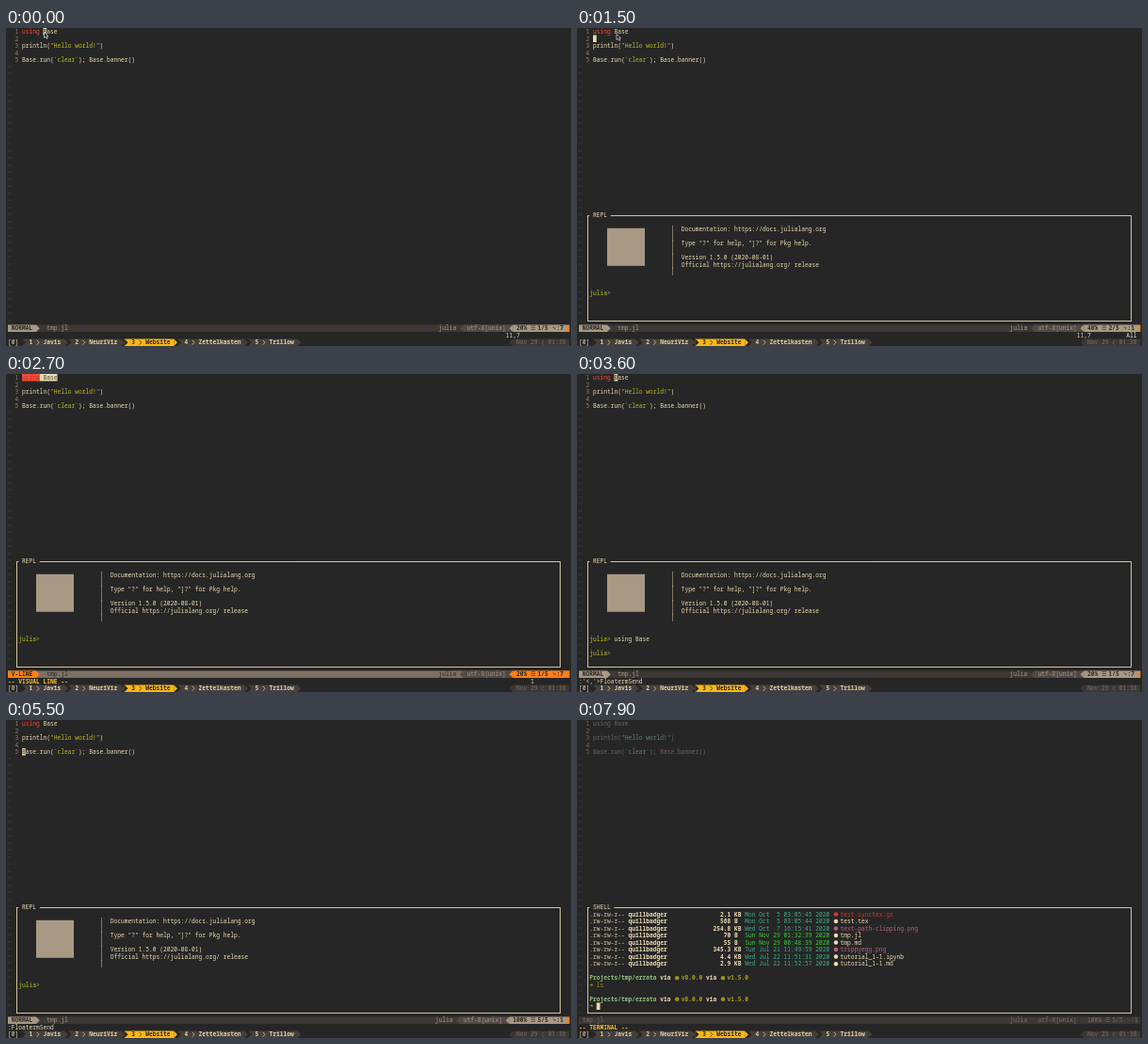
Animation, 600 px wide and 338 px high, one loop 8000 ms. Source, as an HTML page with a canvas:

```html
<!DOCTYPE html>
<html lang="en">
<head>
<meta charset="utf-8">
<title>Editor with a floating REPL</title>
<style>
  html, body { margin: 0; width: 100%; height: 100%; overflow: hidden; background: #262626; }
  canvas { display: block; width: 600px; height: 338px; }
</style>
</head>
<body>
<canvas id="screen"></canvas>
<script>
const LOOP = 8000;
const BG = '#262626', FG = '#ebdbb2', RED = '#fb4934', GREEN = '#b8bb26', ORANGE = '#fe8019',
      SAND = '#a89984', GREY = '#7c6f64', DARK = '#3c3836', MID = '#504945', AQUA = '#8ec07c';

// Drawing units are quarter pixels; the terminal is a grid of 159 x 45 cells.
const CELL_W = 15, CELL_H = 1352 / 45, LEFT = 8;
const FLOAT = { left: 2, right: 156, top: 26, bottom: 41 };

const canvas = document.getElementById('screen');
const ctx = canvas.getContext('2d');
const dpr = window.devicePixelRatio || 1;
canvas.width = 600 * dpr;
canvas.height = 338 * dpr;
ctx.setTransform(dpr / 4, 0, 0, dpr / 4, 0, 0);

const x = col => LEFT + col * CELL_W;
const y = row => row * CELL_H;
const pixelCentre = units => Math.floor(units / 4) * 4 + 2;

function text(col, row, string, color = FG, bold = false) {
  ctx.font = `${bold ? 'bold ' : ''}25px "Noto Sans Mono", "DejaVu Sans Mono", monospace`;
  ctx.fillStyle = color;
  ctx.fillText(string, x(col), y(row) + 24);
}

// Draws [string, color, bold] parts one after another.
function line(col, row, parts) {
  for (const [string, color, bold] of parts) {
    text(col, row, string, color, bold);
    col += string.length;
  }
}

function fill(col, row, cols, color, rows = 1) {
  ctx.fillStyle = color;
  ctx.fillRect(x(col), y(row), cols * CELL_W, rows * CELL_H);
}

function polygon(points, color) {
  ctx.beginPath();
  points.forEach(([px, py]) => ctx.lineTo(px, py));
  ctx.closePath();
  ctx.fillStyle = color;
  ctx.fill();
}

// A triangle filling one cell, pointing right or left.
function arrow(col, row, color, pointsLeft = false) {
  const base = x(pointsLeft ? col + 1 : col), tip = x(pointsLeft ? col : col + 1);
  polygon([[base, y(row)], [tip, y(row + .5)], [base, y(row + 1)]], color);
}

function chevron(col, row, color, pointsLeft = false) {
  const a = x(col) + (pointsLeft ? 12 : 3), b = x(col) + (pointsLeft ? 3 : 12);
  ctx.beginPath();
  ctx.moveTo(a, y(row) + 5);
  ctx.lineTo(b, y(row + .5));
  ctx.lineTo(a, y(row + 1) - 5);
  ctx.strokeStyle = color;
  ctx.lineWidth = 3;
  ctx.stroke();
}

function dot(col, row, color) {
  ctx.beginPath();
  ctx.arc(x(col) + 12, y(row + .5), 9, 0, 7);
  ctx.fillStyle = color;
  ctx.fill();
}

function block(col, row, letter = '') {
  fill(col, row, 1, FG);
  text(col, row, letter, BG);
}

const code = (keyword, plain, string) => [
  [['using', keyword], [' Base', plain]],
  [],
  [['println(', plain], ['"Hello world!"', string], [')', plain]],
  [],
  [['Base.run(', plain], ['`clear`', string], ['); Base.banner()', plain]]
];
const activeCode = code(RED, FG, GREEN);
const dimCode = code('#6b665f', '#6b665f', '#64806c');

function editor(s) {
  (s.focused ? activeCode : dimCode).forEach((parts, row) => {
    text(2, row, String(row + 1), s.focused ? '#928374' : GREY);
    line(4, row, parts);
  });
  for (let row = 5; row < 42; row++) text(0, row, '~', MID);
  if (s.mode === 'V-LINE') {
    fill(4, 0, 5, RED);
    fill(9, 0, 5, FG);
    text(4, 0, 'using', '#a83a30');
    text(10, 0, 'Base', MID);
  } else if (s.focused) {
    block(s.line === 1 ? 10 : 4, s.line - 1, ['B', '', 'p', '', 'B'][s.line - 1]);
  }
}

const prompt = ['julia> ', GREEN];
const banner = ['', 'Documentation: https://docs.julialang.org', '', 'Type "?" for help, "]?" for Pkg help.',
  '', 'Version 1.5.0 (2020-08-01)', 'Official https://julialang.org/ release', '']
  .map((string, i) => i ? [[' '.repeat(23) + '|  ' + string, FG]] : []);
const fresh = [...banner, [], []];
const afterUsing = [...fresh, [prompt, ['using Base', FG]], []];
const afterPrint = [...afterUsing, [prompt, ...activeCode[2]], [['Hello world!', FG]], []];
const sessions = [fresh, afterUsing, afterPrint].map(lines => [...lines, [prompt]]);

function repl(lines) {
  const top = FLOAT.top + 1, scroll = Math.max(0, lines.length - 14);
  ctx.fillStyle = SAND;
  ctx.fillRect(128, y(top - scroll) + 40, 160, 160);
  fill(FLOAT.left, top - 3, 80, BG, 3);
  lines.slice(scroll).forEach((parts, i) => line(3, top + i, parts));
}

const TEAL = '#3fae8c', LIME = '#35d435', PINK = '#b16286';
const files = [
  ['2.1', 'KB', 'Mon Oct  5 03:05:45 2020', TEAL, 'test.synctex.gz', '#d83a2c'],
  ['568', 'B', 'Mon Oct  5 03:05:44 2020', TEAL, 'test.tex', FG],
  ['254.8', 'KB', 'Wed Oct  7 16:15:41 2020', TEAL, 'text-path-clipping.png', PINK],
  ['70', 'B', 'Sun Nov 29 01:32:39 2020', LIME, 'tmp.jl', FG],
  ['55', 'B', 'Sun Nov 29 00:48:39 2020', LIME, 'tmp.md', FG],
  ['345.3', 'KB', 'Tue Jul 21 11:49:59 2020', TEAL, 'trippyegg.png', PINK],
  ['4.4', 'KB', 'Wed Jul 22 11:51:31 2020', TEAL, 'tutorial_1-1.ipynb', FG],
  ['2.9', 'KB', 'Wed Jul 22 11:52:57 2020', TEAL, 'tutorial_1-1.md', FG]
];

function shell() {
  files.forEach(([size, unit, date, dateColor, name, color], i) => {
    const row = 27 + i;
    line(3, row, [['.rw-rw-r-- ', '#d5c4a1'], ['quillbadger', FG, true],
      [size.padStart(18) + ' ' + unit.padEnd(3), FG, true], [date, dateColor]]);
    dot(72, row, color);
    text(74, row, name, color);
  });
  for (const row of [36, 39]) {
    text(3, row, 'Projects/tmp/errata', AQUA, true);
    text(23, row, 'via', FG, true);
    dot(27, row, '#98971a');
    text(29, row, 'v8.0.0', '#a3a31f', true);
    text(36, row, 'via', FG, true);
    dot(40, row, '#98971a');
    text(42, row, 'v1.5.0', '#a3a31f', true);
    text(3, row + 1, '➜', GREEN);
  }
  text(5, 37, 'ls', '#98971a');
  block(5, 40);
}

function floatWindow(s) {
  const { left, right, top, bottom } = FLOAT;
  fill(left, top, right - left + 1, BG, bottom - top + 1);
  if (s.float === 'SHELL') shell();
  else repl(sessions[s.session]);
  if (s.float === 'REPL' && !s.focused) block(3, 40);
  const x1 = pixelCentre(x(left + .5)), x2 = pixelCentre(x(right + .5));
  const y1 = pixelCentre(y(top + .5)), y2 = pixelCentre(y(bottom + .5));
  ctx.strokeStyle = '#d5c4a1';
  ctx.lineWidth = 4;
  ctx.strokeRect(x1, y1, x2 - x1, y2 - y1);
  fill(left + 1, top, s.float.length + 2, BG);
  text(left + 2, top, s.float);
}

function statusLine(s) {
  const row = 42, visual = s.mode === 'V-LINE', inactive = s.mode === '';
  const percent = s.line * 20 + '%', lines = s.line + '/5';
  const column = ':' + (s.line === 1 ? 7 : 1);
  fill(0, row, 159, visual ? GREY : DARK);
  if (inactive) {
    text(1, row, 'tmp.jl', GREY);
    text(122, row, 'julia', GREY);
    text(130, row, 'utf-8[unix]', GREY);
    text(144, row, `${percent} ☰`, GREY);
    text(151, row, lines, GREY);
    text(155, row, '␊' + column, GREY);
    return;
  }
  const accent = visual ? ORANGE : SAND, label = visual ? '#282828' : SAND;
  fill(0, row, 8, accent);
  arrow(8, row, accent);
  text(1, row, s.mode, '#282828', true);
  text(11, row, 'tmp.jl', label);

  // The right-hand sections are pushed left by a longer percentage.
  const start = 147 - percent.length;
  text(start - 22, row, 'julia', label);
  arrow(start - 16, row, MID, true);
  fill(start - 15, row, 14, MID);
  text(start - 14, row, 'utf-8[unix]', SAND);
  arrow(start - 2, row, accent, true);
  fill(start - 1, row, 160 - start, accent);
  text(start, row, percent, '#282828', true);
  text(148, row, '☰', '#282828');
  text(150, row, lines, '#282828', true);
  text(154, row, '␊' + column, '#282828', true);
  arrow(158, row, ORANGE, true);
}

function commandLine(s) {
  const isMode = s.command.startsWith('--');
  text(0, 43, s.command, isMode ? '#fabd2f' : FG, isMode);
  text(141, 43, s.ruler);
  text(155, 43, s.position);
  if (s.mode === 'V-LINE') text(148, 43, '1');
}

function tabBar() {
  const row = 44;
  text(0, row, '[0]');
  let col = 4;
  ['Javis', 'NeuriViz', 'Website', 'Zettelkasten', 'Trillow'].forEach((name, i) => {
    const active = i === 2, color = active ? '#fdb711' : '#45403c', ink = active ? '#282828' : '#e0d0a8';
    const end = col + name.length + 7;
    fill(col, row, end - col, color);
    arrow(col, row, BG);
    arrow(end, row, color);
    text(col + 2, row, String(i + 1), ink, true);
    chevron(col + 4, row, ink);
    text(col + 6, row, name, ink, true);
    col = end + 1;
  });
  arrow(142, row, DARK, true);
  fill(143, row, 16, DARK);
  text(144, row, 'Nov 29', GREY);
  chevron(151, row, GREY, true);
  text(153, row, '01:38', GREY);
}

function mousePointer(px, py) {
  const shape = [[0, 0], [0, 24], [6, 19], [11, 28], [15, 26], [11, 17], [18, 17]]
    .map(([dx, dy]) => [px * 4 + dx, py * 4 + dy]);
  polygon(shape, '#111');
  ctx.strokeStyle = '#ddd';
  ctx.lineWidth = 3;
  ctx.stroke();
}

// Each step lists only what changes at its time.
const steps = [
  [0, { mode: 'NORMAL', line: 1, focused: true, float: '', session: 0, command: '',
        ruler: '11,7', position: '', mouse: [40.5, 4.5] }],
  [100, { float: 'REPL', position: 'All' }],
  [1400, { line: 2, mouse: [42, 6.5] }],
  [2000, { line: 1 }],
  [2500, { mode: 'V-LINE', command: '-- VISUAL LINE --', ruler: '', position: '', mouse: null }],
  [3400, { mode: 'NORMAL', command: ":'<,'>FloatermSend", session: 1 }],
  [3800, { line: 2 }],
  [4000, { line: 3 }],
  [4200, { command: ':FloatermSend', session: 2 }],
  [4800, { line: 4 }],
  [5000, { line: 5 }],
  [5300, { session: 0 }],
  [6700, { focused: false, ruler: '17,0-1', position: 'Bot' }],
  [7500, { mode: '', command: '-- TERMINAL --', ruler: '', position: '' }],
  [7900, { float: 'SHELL' }]
];

function draw(time) {
  const t = time % LOOP;
  const s = Object.assign({}, ...steps.filter(([start]) => start <= t).map(([, change]) => change));
  ctx.fillStyle = BG;
  ctx.fillRect(0, 0, 2400, 1352);
  editor(s);
  if (s.float) floatWindow(s);
  statusLine(s);
  commandLine(s);
  tabBar();
  if (s.mouse) mousePointer(...s.mouse);
}

const begin = performance.now();
function frame() {
  draw(performance.now() - begin);
  requestAnimationFrame(frame);
}
frame();
</script>
</body>
</html>
```
